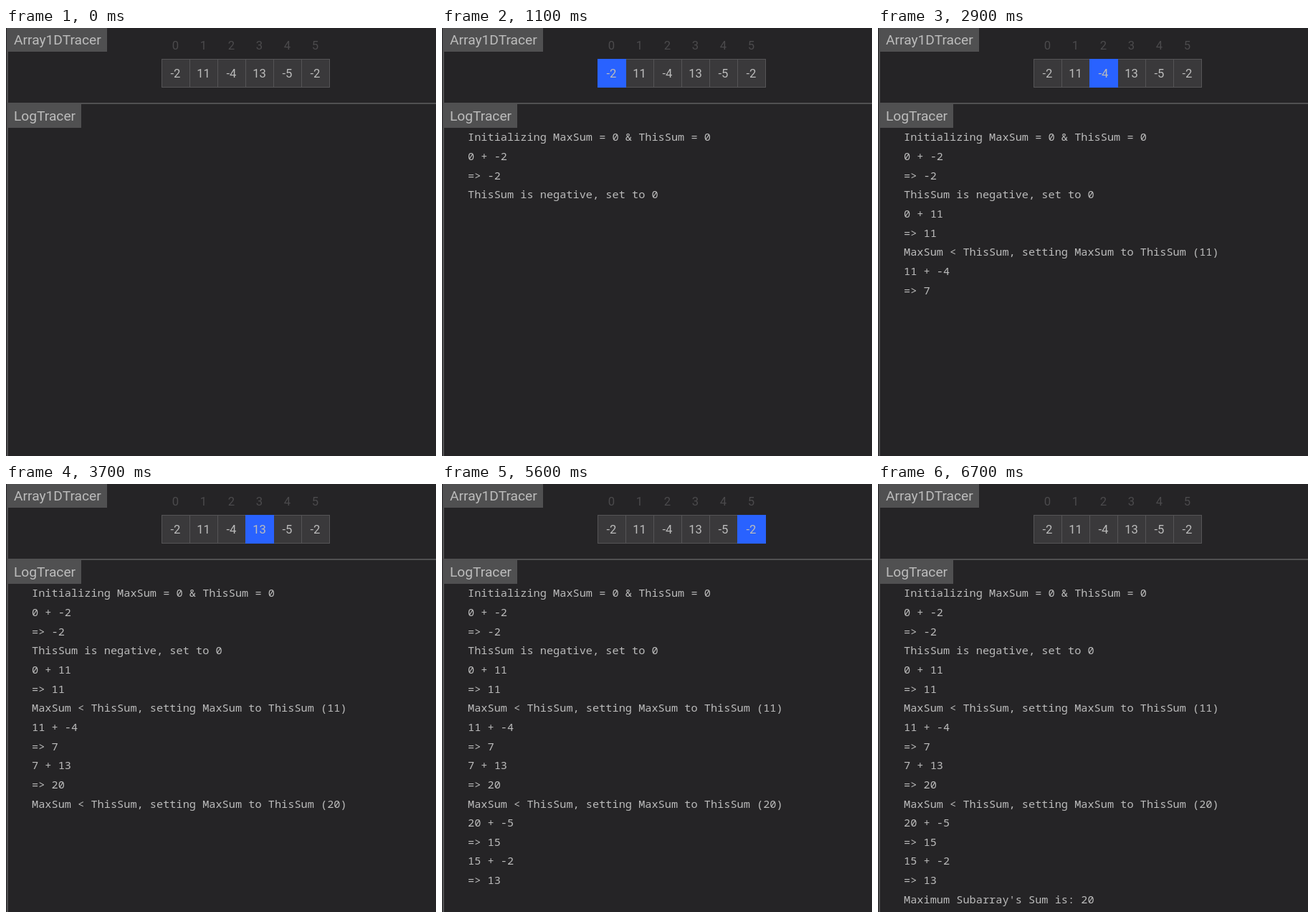
An HTML page for the animation above (10 s loop, 600 by 596 pixels).

```html
<!DOCTYPE html>
<html lang="en">
<head>
<meta charset="utf-8">
<title>Maximum subarray trace</title>
<style>
  :root {
    --dark: #252426;
    --mid: #3a393b;
    --light: #505051;
    --text: #bcbcbc;
    --row: 26.66px;
    --cell: 39px;
  }
  html, body { margin: 0; width: 100%; height: 100%; overflow: hidden; }
  body {
    position: relative;
    background: var(--dark);
    color: var(--text);
    font: 16.67px/40px Roboto, sans-serif;
  }
  body > * { position: absolute; box-sizing: border-box; }

  .edge { left: 1px; top: 0; width: 2px; height: 100%; background: var(--light); }
  .divider { left: 1px; top: 104px; width: 599px; height: 2px; background: var(--light); }
  .label {
    left: 3px;
    height: 33px;
    padding: 0 8px;
    background: var(--light);
    font-size: 19.2px;
    line-height: 33px;
  }

  .row { left: 217px; display: flex; text-align: center; }
  .row span { box-sizing: border-box; width: var(--cell); }
  .index { top: 5px; color: #4b4a4c; }
  .boxes { top: 43px; width: 235px; height: 40px; background: var(--mid); border: 1px solid #555456; border-right: 0; }
  .boxes span { height: 38px; border-right: 1px solid #555456; }
  .values { top: 44px; }

  .mark {
    left: 217px;
    top: 43px;
    width: 40px;
    height: 40px;
    background: #2962ff;
    animation: visit 10s step-end infinite;
  }
  .log {
    left: 36px;
    top: 138.3px;
    margin: 0;
    overflow: hidden;
    font: 15.275px/var(--row) "Noto Sans Mono", monospace;
    animation: print 10s step-end infinite;
  }

  @keyframes visit {
    0%   { visibility: hidden; transform: none; }
    10%  { visibility: visible; transform: none; }
    19%  { visibility: visible; transform: translateX(var(--cell)); }
    28%  { visibility: visible; transform: translateX(calc(2 * var(--cell))); }
    37%  { visibility: visible; transform: translateX(calc(3 * var(--cell))); }
    46%  { visibility: visible; transform: translateX(calc(4 * var(--cell))); }
    56%  { visibility: visible; transform: translateX(calc(5 * var(--cell))); }
    65%, 100% { visibility: hidden; transform: none; }
  }
  /* Each step reveals whole log rows. */
  @keyframes print {
    0%   { height: 0; }
    10%  { height: calc(4 * var(--row)); }
    19%  { height: calc(7 * var(--row)); }
    28%  { height: calc(9 * var(--row)); }
    37%  { height: calc(12 * var(--row)); }
    46%  { height: calc(14 * var(--row)); }
    56%  { height: calc(16 * var(--row)); }
    65%, 100% { height: calc(17 * var(--row)); }
  }
</style>
</head>
<body>
  <div class="edge"></div>
  <div class="divider"></div>
  <div class="label" style="top: 0">Array1DTracer</div>
  <div class="label" style="top: 106px">LogTracer</div>

  <div class="row index"><span>0</span><span>1</span><span>2</span><span>3</span><span>4</span><span>5</span></div>
  <div class="row boxes"><span></span><span></span><span></span><span></span><span></span><span></span></div>
  <div class="mark"></div>
  <div class="row values"><span>-2</span><span>11</span><span>-4</span><span>13</span><span>-5</span><span>-2</span></div>

  <pre class="log">Initializing MaxSum = 0 &amp; ThisSum = 0
0 + -2
=&gt; -2
ThisSum is negative, set to 0
0 + 11
=&gt; 11
MaxSum &lt; ThisSum, setting MaxSum to ThisSum (11)
11 + -4
=&gt; 7
7 + 13
=&gt; 20
MaxSum &lt; ThisSum, setting MaxSum to ThisSum (20)
20 + -5
=&gt; 15
15 + -2
=&gt; 13
Maximum Subarray's Sum is: 20</pre>
</body>
</html>
```
